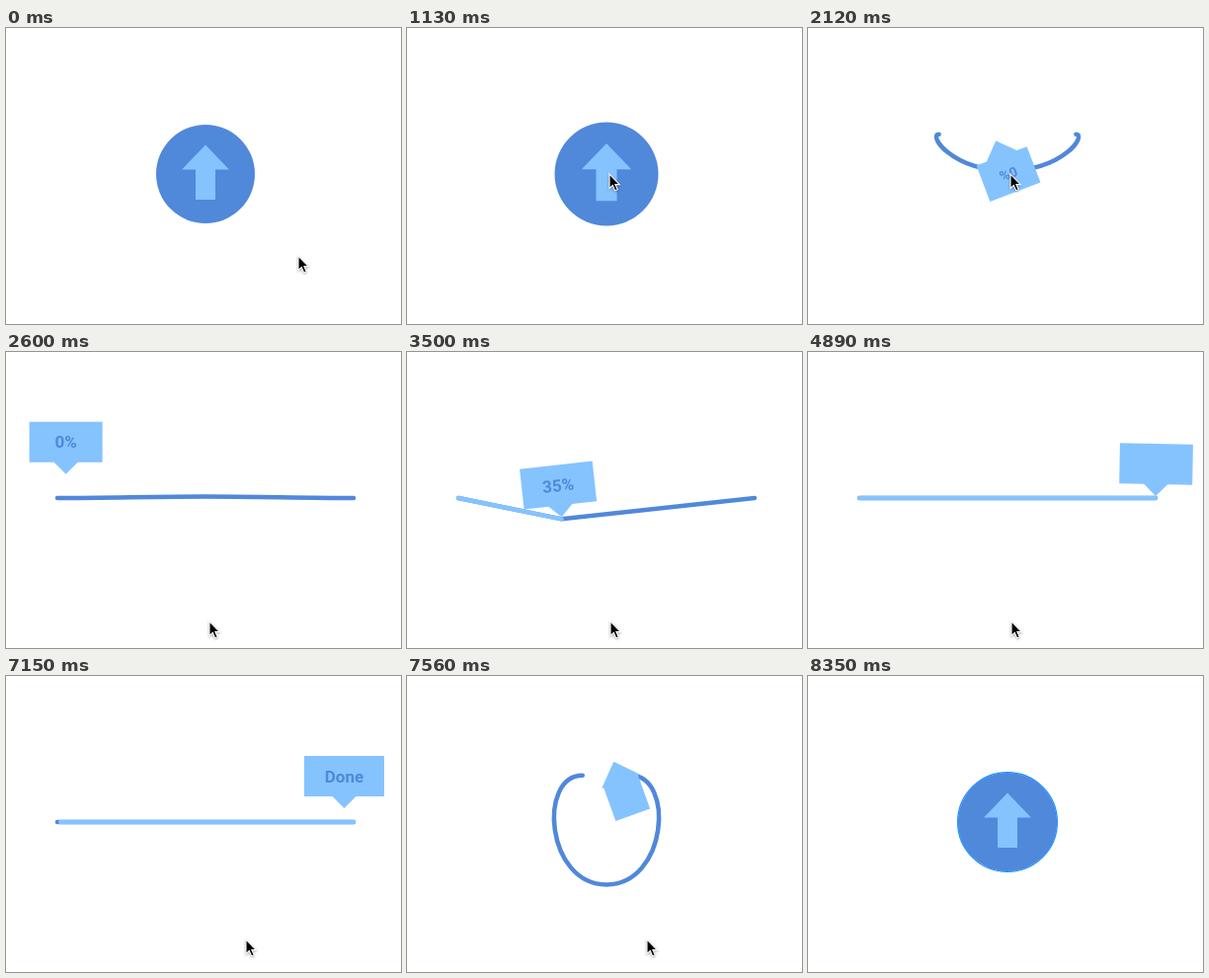
An HTML page that plays this animation: 400 px wide and 300 px high, repeating every 8910 ms.

```html
<!DOCTYPE html>
<html lang="en">
<head>
<meta charset="utf-8">
<title>Elastic upload button</title>
<style>
  html, body { margin: 0; width: 100%; height: 100%; overflow: hidden; background: #fff; }
  svg { display: block; width: 100%; height: 100%; }
  text { font: 600 17px Roboto, Arial, sans-serif; text-anchor: middle; fill: #5088da; }
  .line { fill: none; stroke-linecap: round; }
  #cursor { filter: drop-shadow(0 1px 1px rgba(0, 0, 0, .35)); }
</style>
</head>
<body>
<svg viewBox="0 0 400 300">
  <g id="stage">
    <circle id="disc" cx="202" cy="148" r="50" fill="#5088da"/>
    <circle id="ring" cx="202" cy="148" r="50.4" fill="none" stroke="#1e90ff" stroke-width="1.3"/>
    <path id="track" class="line" stroke="#5088da"/>
    <path id="bar" class="line" stroke="#85c3ff"/>
    <g id="label">
      <path id="shape" fill="#85c3ff"/>
      <text id="caption" y="6.2"></text>
    </g>
  </g>
  <path id="cursor" d="M0 0V14.6L3.3 11.5L5.7 16.9L8.2 15.8L5.9 10.6H10.3Z" fill="#000" stroke="#fff" stroke-width="1.1"/>
</svg>
<script>
const LOOP = 8910, CX = 202, CY = 148, REACH = 150, R = 50, WEIGHT = 4.5;
const LEFT = CX - REACH, RIGHT = CX + REACH;
const OPEN = 1860, LAND = 2730, CLOSE = 7130, CURL = 7330, CLOSED = 7930;

const el = id => document.getElementById(id);
const [stage, disc, ring, track, bar, label, shape, caption, cursor] =
  ['stage', 'disc', 'ring', 'track', 'bar', 'label', 'shape', 'caption', 'cursor'].map(el);
const set = (node, attrs) => { for (const k in attrs) node.setAttribute(k, attrs[k]); };
const show = (node, on) => set(node, { visibility: on ? 'visible' : 'hidden' });

const mix = (a, b, u) => a + (b - a) * u;
const phase = (t, from, to) => Math.min(1, Math.max(0, (t - from) / (to - from)));
const smooth = (t, from, to) => { const q = phase(t, from, to); return q * q * (3 - 2 * q); };
const easeOut = (t, from, to) => 1 - (1 - phase(t, from, to)) ** 2;
// Falls from 1 and swings around 0
const spring = (ms, period, decay) =>
  ms <= 0 ? 1 : Math.exp(-decay * ms) * Math.cos(2 * Math.PI * ms / period);

// [from, to, dx, dy]
const moves = [
  [570, 1120, -91, -83],
  [2130, 2600, 1, 125],
  [5250, 5720, 37, -6],
  [8060, 8330, 62, 37],
];

function drawCursor(t) {
  let x = 296, y = 231;
  for (const [from, to, dx, dy] of moves) {
    const e = smooth(t, from, to);
    x += dx * e;
    y += dy * e;
  }
  set(cursor, { transform: `translate(${x} ${y})` });
}

// Ring that unrolls from its top into a line, and rolls up again
function drawString(t) {
  const opening = t < LAND;
  const spread = opening ? smooth(t, 1950, 2310) : 1 - smooth(t, CURL, CURL + 310);
  const solid = opening ? 1 - smooth(t, OPEN, 1990) : smooth(t, 7670, CLOSED);
  const swing = spring(t - (opening ? 2000 : CURL), 446, .0048);
  const width = mix(WEIGHT, R, solid), r = R - width / 2;
  const endY = CY - r * (1 - spread ** 2.4), midY = CY + r * (opening ? swing : 1 - swing);
  const near = mix(r * 4 / 3, REACH / 3, spread), far = mix(r * 4 / 3, REACH * 2 / 3, spread);
  const half = s => `M${CX} ${midY}C${CX + s * near} ${midY} ${CX + s * far} ${endY} ${CX + s * REACH * spread} ${endY}`;
  set(track, { d: half(-1) + half(1), 'stroke-width': width });
}

function drawBar(t, x, y) {
  const from = mix(LEFT, RIGHT, phase(t, CLOSE, CURL) ** 2);
  set(track, { d: `M${LEFT} ${CY}L${x} ${y}L${RIGHT} ${CY}`, 'stroke-width': WEIGHT });
  set(bar, { d: `M${from} ${CY}L${x} ${y}`, 'stroke-width': WEIGHT });
}

// u: 0 is the arrow, 1 is the speech label; local origin is the tip
function drawLabel(x, y, turn, u, full, fromCentre) {
  const w = mix(20, full, u), h = mix(30.5, 41, Math.sqrt(u));
  const base = mix(48, 24, u), len = mix(25, 12, u), shift = fromCentre ? (h + len) / 2 : 0;
  set(label, { transform: `translate(${x} ${y}) rotate(${turn}) translate(0 ${shift})` });
  set(shape, { d: `M0 0L${-base / 2} ${-len}H${-w / 2}V${-len - h}H${w / 2}V${-len}H${base / 2}Z` });
  set(caption, { transform: `translate(0 ${-len - h / 2}) scale(${.5 + u / 2})` });
}

// Arc between the button (e = 0) and one end of the line (e = 1)
function flyLabel(e, side, power, turn, u, full) {
  const y = mix(146.2, 119.5, e) - 110 * (4 * e * (1 - e)) ** power;
  drawLabel(CX + side * REACH * e, y, turn, u, full, true);
}

function render(t) {
  const idle = t < OPEN || t >= CLOSED, loading = t >= LAND && t < CURL;
  const zoom = 1 + .05 * (smooth(t, 860, 1110) - smooth(t, 1850, 1950));
  set(stage, { transform: `translate(${CX} ${CY}) scale(${zoom}) translate(${-CX} ${-CY})` });
  show(disc, idle);
  show(ring, t >= CLOSED);
  show(track, !idle);
  show(bar, loading && t > 2780);
  drawCursor(t);

  const p = mix(phase(t, 2770, 4760), smooth(t, 2770, 4760), .3);
  const x = mix(LEFT, RIGHT, p), y = CY + 24 * Math.sin(Math.PI * p);
  if (loading) drawBar(t, x, y);
  else if (!idle) drawString(t);

  const full = mix(74, 81, smooth(t, 4960, 5400));
  if (t < LAND) {
    flyLabel(smooth(t, 2080, 2690), -1, 1, 180 * (1 - smooth(t, 2030, 2460)), easeOut(t, 1890, 2465), full);
  } else if (t < CLOSE) {
    const tilt = -6.3 * smooth(t, 2760, 2960) * spring(t - 4645, 350, .0025);
    drawLabel(x, y - 2, tilt, 1, full, false);
  } else {
    flyLabel(1 - easeOut(t, CLOSE, 7780), 1, 1.45, 180 * smooth(t, 7180, 7660), 1 - smooth(t, 7300, 7700), full);
  }

  caption.textContent = t > 4890 ? 'Done' : Math.round(p * 100) + '%';
  set(caption, {
    opacity: smooth(t, 1950, 2110) - smooth(t, 4770, 4880) + easeOut(t, 5000, 5900) - smooth(t, 7160, 7320)
  });
}

const start = performance.now();
function tick() {
  render((performance.now() - start) % LOOP);
  requestAnimationFrame(tick);
}
tick();
</script>
</body>
</html>
```
